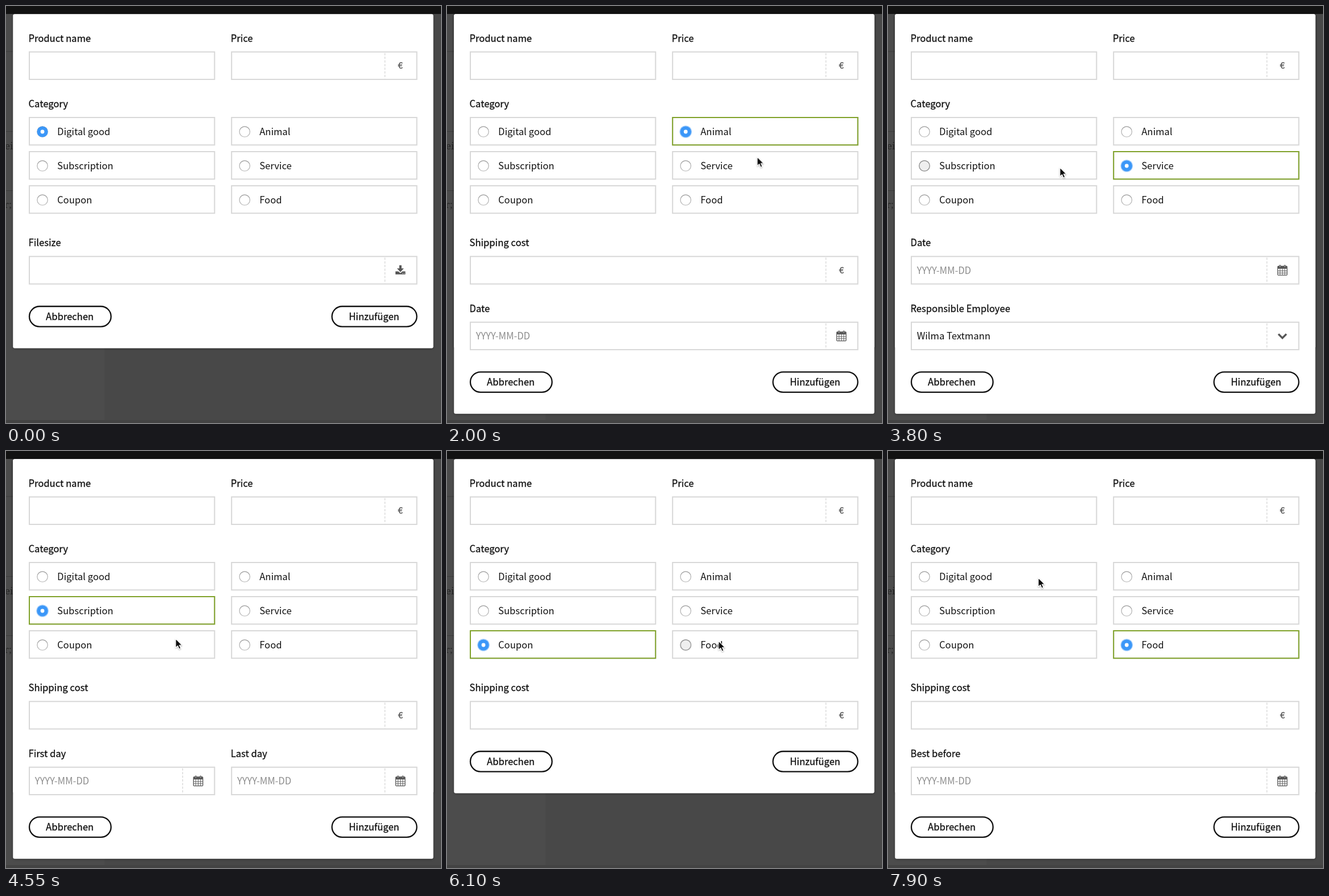
These frames come from a looping animation (764 px wide and 733 px high, 8 s). An HTML page:

```html
<!DOCTYPE html>
<html lang="en">
<head>
<meta charset="utf-8">
<title>Product form</title>
<style>
html, body { margin: 0; width: 100%; height: 100%; overflow: hidden; background: #484848; }
svg { display: block; width: 764px; height: 733px; }
text { font: 400 16.6px "Noto Sans CJK JP", "Noto Sans CJK SC", "Noto Sans CJK", "Open Sans", sans-serif; fill: #111; }
.label { font-weight: 500; stroke: #111; stroke-width: .3px; }
.hint { fill: #8c8c8c; }
.mid { text-anchor: middle; }
.field { fill: #fff; stroke: #d8d8d8; stroke-width: 2; }
.split { stroke: #d8d8d8; stroke-width: 1.4; stroke-dasharray: 4 2.4; }
.pill { fill: #fff; stroke: #111; stroke-width: 2.3; }
.focus { fill: none; stroke: #80a22a; stroke-width: 2; }
.icon { fill: #555; }
.ghost { font: 17px "Noto Serif", serif; fill: #262626; }

/* one loop is 8 s, so 1% = 80 ms */
.view, .tall, .press { visibility: hidden; }
.view, .tall, .press, .buttons { animation: 8s step-end infinite; }
#digital { animation-name: digital; }
#animal { animation-name: animal; }
#service { animation-name: service; }
#subscription { animation-name: subscription; }
#coupon { animation-name: coupon; }
#food { animation-name: food; }
.tall { animation-name: tall; }
.buttons { animation-name: buttons; }
.press { animation-name: press; }
.cursor { animation: cursor 8s ease-in-out infinite; }

@keyframes digital { 0% { visibility: visible } 18.75%, 100% { visibility: hidden } }
@keyframes animal { 0% { visibility: hidden } 18.75% { visibility: visible } 29.375%, 100% { visibility: hidden } }
@keyframes service { 0% { visibility: hidden } 29.375% { visibility: visible } 48.75%, 100% { visibility: hidden } }
@keyframes subscription { 0% { visibility: hidden } 48.75% { visibility: visible } 63.125%, 100% { visibility: hidden } }
@keyframes coupon { 0% { visibility: hidden } 63.125% { visibility: visible } 76.875%, 100% { visibility: hidden } }
@keyframes food { 0% { visibility: hidden } 76.875%, 100% { visibility: visible } }
@keyframes tall {
  0%, 63.125% { visibility: hidden }
  18.75%, 76.875%, 100% { visibility: visible }
}
@keyframes buttons {
  0%, 63.125% { transform: none }
  18.75%, 76.875%, 100% { transform: translateY(115.3px) }
}
@keyframes press {
  0%, 18.75%, 29.375%, 48.75%, 63.125%, 76.875%, 100% { visibility: hidden }
  17.5% { visibility: visible; transform: translate(419.3px, 221px) }
  28.125% { visibility: visible; transform: translate(419.3px, 281px) }
  47.5% { visibility: visible; transform: translate(64px, 281px) }
  61.875% { visibility: visible; transform: translate(64px, 341px) }
  75.625% { visibility: visible; transform: translate(419.3px, 341px) }
}
@keyframes cursor {
  0% { visibility: hidden; transform: translate(745px, 330px); animation-timing-function: step-end }
  .625% { visibility: visible; transform: translate(745px, 330px) }
  13.75%, 20% { transform: translate(640px, 224px) }
  28.125%, 42.5% { transform: translate(503px, 283.5px) }
  47.5%, 52.5% { transform: translate(302px, 284px) }
  56.875% { transform: translate(298px, 330px) }
  60.625%, 66.25% { transform: translate(301px, 343px) }
  75.625%, 91.875% { transform: translate(477px, 334px) }
  98.75%, 100% { visibility: visible; transform: translate(264px, 223px) }
}
</style>
</head>
<body>
<svg viewBox="0 0 764 733">
  <defs>
    <linearGradient id="rim" x2="0" y2="1">
      <stop stop-color="#989898"/><stop offset="1" stop-color="#c4c4c4"/>
    </linearGradient>
    <filter id="shade" x="-5%" y="-5%" width="110%" height="110%">
      <feDropShadow dx="0" dy="1" stdDeviation="2" flood-opacity=".35"/>
    </filter>
    <filter id="drop" x="-50%" y="-50%" width="200%" height="200%">
      <feDropShadow dx="0" dy="1.2" stdDeviation="1" flood-opacity=".35"/>
    </filter>
    <rect id="half" x="41" y="1" width="325.3" height="48.3"/>
    <rect id="wide" x="41" y="1" width="680.5" height="48.3"/>
    <g id="off"><circle r="9.2" fill="#fff" stroke="url(#rim)" stroke-width="1.2"/></g>
    <g id="on"><circle r="9.6" fill="#3b97f8"/><circle r="3.4" fill="#fff"/></g>
    <g id="glow"><circle r="10.8" fill="#9fcbfa"/><use href="#on"/></g>
    <g id="euro"><text class="mid" y="5.8" style="font-size:15.5px;font-weight:500;fill:#555;stroke:#555;stroke-width:.3px">€</text></g>
    <g id="save" class="icon">
      <path d="M-2-8.500h4v5.500h4L0 3.500-6-3h4z"/>
      <path d="M-8.700 2.200h5L0 5.200 3.700 2.200h5v5.200H-8.700z"/>
      <path d="M3.200 5.600h1.300M6 5.600h1.300" stroke="#fff" stroke-width="1"/>
    </g>
    <g id="calendar" fill="none" stroke="#555">
      <rect x="-8.200" y="-6.800" width="16.400" height="15.600" rx="1" stroke-width="1.300"/>
      <path d="M-8-4.500H8" stroke-width="4"/>
      <path d="M-4.200-3V8.500M0-3V8.500M4.200-3V8.500M-8 1.300H8M-8 5H8" stroke-width=".9"/>
      <path d="M-4.200-9v4.200M4.200-9v4.200" stroke-width="2.800"/>
      <path d="M-4.200-8.300v3M4.200-8.300v3" stroke="#ddd" stroke-width=".8"/>
    </g>
    <path id="chevron" d="M-7-3.200 0 3.800 7-3.200" fill="none" stroke="#555" stroke-width="3.400"/>
    <path id="split" class="split" d="M0 3V48"/>
  </defs>

  <rect width="764" height="733" fill="#484848"/>
  <rect y="14" width="173" height="714" fill="#4c4c4c"/>
  <rect y="728" width="764" height="5" fill="#434343"/>
  <rect width="764" height="14" fill="#121212"/>
  <path d="M0 80H12M0 220.500H12M0 324.500H12" stroke="#3c3c3c"/>
  <text class="ghost" x="-2" y="252">ei</text>
  <text class="ghost" x="-3" y="355">r;</text>

  <rect x="12.300" y="14.300" width="738.200" height="587.200" rx="3" fill="#fff" filter="url(#shade)"/>
  <rect class="tall" x="12.300" y="14.300" width="738.200" height="702.500" rx="3" fill="#fff" filter="url(#shade)"/>

  <text class="label" x="39.500" y="62.700">Product name</text>
  <text class="label" x="394.700" y="62.700">Price</text>
  <text class="label" x="39.500" y="178">Category</text>
  <use href="#half" class="field" y="79.700"/>
  <use href="#half" class="field" x="355.200" y="79.700"/>
  <use href="#split" x="665.500" y="79.700"/>
  <use href="#euro" x="692.500" y="104.500"/>
  <g id="options"></g>

  <use class="press" href="#pressed"/>
  <g class="press"><circle r="9.200" fill="#efefef" stroke="#8f8f8f" stroke-width="1.200"/></g>

  <g class="view" id="digital"></g>
  <g class="view" id="animal"></g>
  <g class="view" id="service"></g>
  <g class="view" id="subscription"></g>
  <g class="view" id="coupon"></g>
  <g class="view" id="food"></g>

  <g class="buttons">
    <rect class="pill" x="41" y="528" width="143.500" height="35.600" rx="17.800"/>
    <rect class="pill" x="572.500" y="528" width="149" height="35.600" rx="17.800"/>
    <text class="label mid" x="112" y="551.800">Abbrechen</text>
    <text class="label mid" x="646.500" y="551.800">Hinzufügen</text>
  </g>

  <g class="cursor">
    <path d="M0 0V15.600L3.600 12.300 6.100 18 8.900 16.800 6.400 11.300H11.200Z" fill="#080808" stroke="#fff" stroke-width="1.100" stroke-linejoin="round" filter="url(#drop)"/>
  </g>
</svg>
<script>
const COL = 355.2, ROWS = [439.3, 554.8];
const use = (id, x, y, cls = '') => `<use href="#${id}" x="${x}" y="${y}" class="${cls}"/>`;
const text = (s, x, y, cls = '') => `<text x="${x}" y="${y}" class="${cls}">${s}</text>`;

// a labelled input; col is set only for half-width fields
function field(row, label, icon, value = '', cls = 'hint', col = -1) {
  const y = ROWS[row], x = Math.max(col, 0) * COL, right = col === 0 ? 0 : COL;
  return text(label, 39.5 + x, y - 16.9, 'label')
    + use(col < 0 ? 'wide' : 'half', x, y, 'field')
    + use('split', 310.3 + right, y)
    + use(icon, 337.5 + right, y + 25)
    + text(value, 50.7 + x, y + 31.4, cls);
}

const day = 'YYYY-MM-DD';
const shipping = field(0, 'Shipping cost', 'euro');
const options = [
  ['digital', 'Digital good', field(0, 'Filesize', 'save')],
  ['animal', 'Animal', shipping + field(1, 'Date', 'calendar', day)],
  ['subscription', 'Subscription', shipping
    + field(1, 'First day', 'calendar', day, 'hint', 0)
    + field(1, 'Last day', 'calendar', day, 'hint', 1)],
  ['service', 'Service', field(0, 'Date', 'calendar', day)
    + field(1, 'Responsible Employee', 'chevron', 'Wilma Textmann', '')],
  ['coupon', 'Coupon', shipping],
  ['food', 'Food', shipping + field(1, 'Best before', 'calendar', day)]
];

let list = '';
options.forEach(([id, name, fields], i) => {
  const x = i % 2 * COL, y = 195 + (i >> 1) * 60;
  list += use('half', x, y, 'field') + use('off', 64 + x, y + 26)
    + text(name, 90 + x, y + 31.7);
  const mark = i ? use('half', x, y, 'focus') + use('glow', 64 + x, y + 26)
    : use('on', 64, y + 26);
  document.getElementById(id).innerHTML = mark + fields;
});
document.getElementById('options').innerHTML = list;
</script>
</body>
</html>
```
